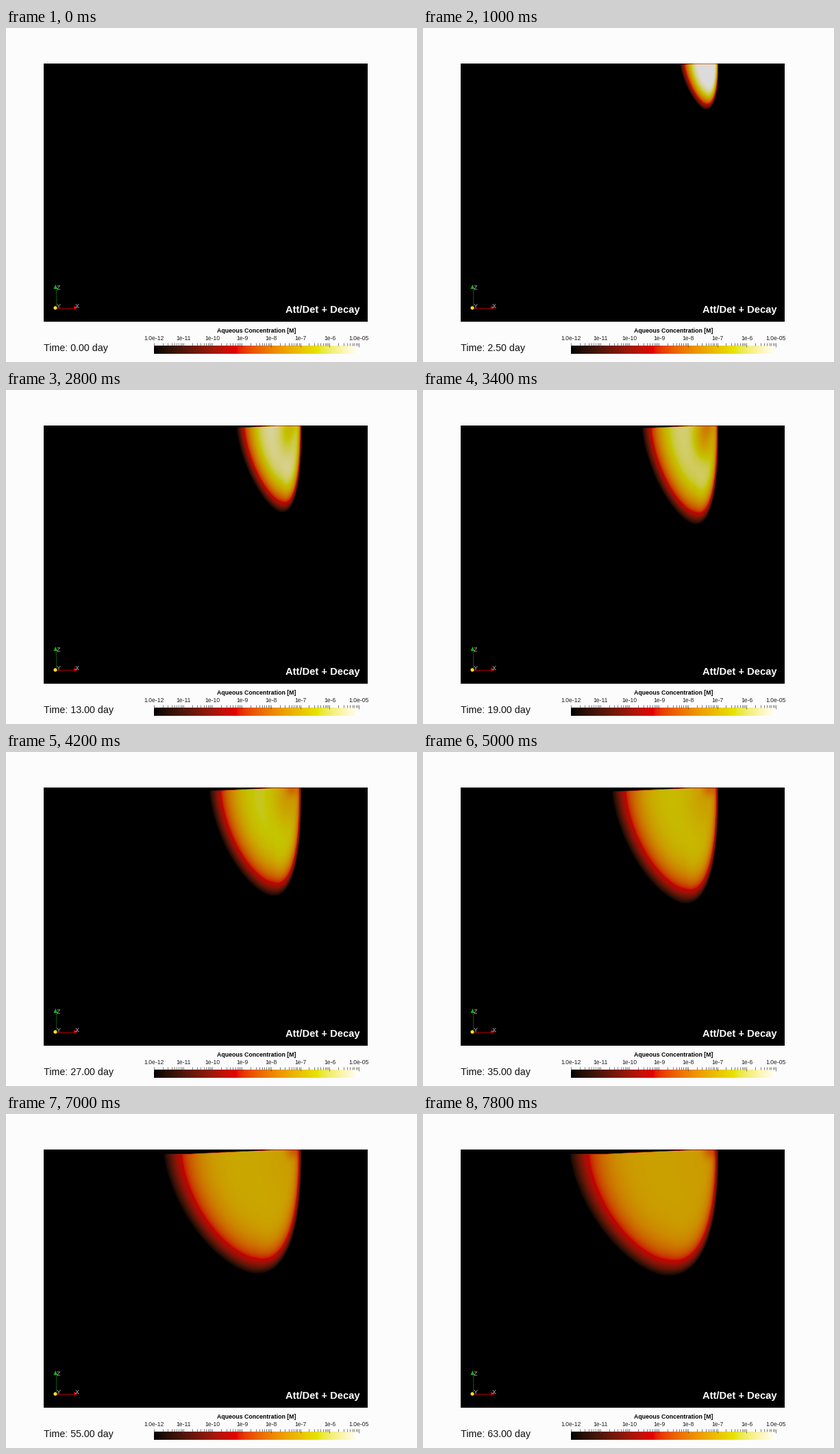
A matplotlib script for the animation above (8 s loop, 600 px wide and 489 px high).

```python
import numpy as np
import matplotlib.pyplot as plt
from matplotlib.animation import FuncAnimation
from matplotlib.patches import Circle, Polygon, Rectangle

W, H, DPI = 600, 489, 96
FRAMES, STEP_MS = 40, 200
LIGHT = 0.86  # shading of the lit surface against the plain colour bar

# Black-body colour map, blended in CIE Lab
STOPS = [0, 0.4, 0.8, 1]
STOP_RGB = np.array([[0, 0, 0], [0.9, 0, 0], [0.9, 0.9, 0], [1, 1, 1]])
TO_XYZ = np.array([[0.4124, 0.3576, 0.1805],
                   [0.2126, 0.7152, 0.0722],
                   [0.0193, 0.1192, 0.9505]])
WHITE = TO_XYZ.sum(axis=1)


def rgb_to_lab(rgb):
    lin = np.where(rgb > 0.04045, ((rgb + 0.055) / 1.055) ** 2.4, rgb / 12.92)
    t = lin @ TO_XYZ.T / WHITE
    f = np.where(t > 0.008856, np.cbrt(t), 7.787 * t + 16 / 116)
    x, y, z = f.T
    return np.stack([116 * y - 16, 500 * (x - y), 200 * (y - z)], axis=1)


def lab_to_rgb(lab):
    y = (lab[:, 0] + 16) / 116
    f = np.stack([y + lab[:, 1] / 500, y, y - lab[:, 2] / 200], axis=1)
    t = np.where(f > 0.2069, f ** 3, (f - 16 / 116) / 7.787)
    lin = np.clip(t * WHITE @ np.linalg.inv(TO_XYZ).T, 0, 1)
    return np.where(lin > 0.0031308, 1.055 * lin ** (1 / 2.4) - 0.055, 12.92 * lin)


levels = np.linspace(0, 1, 512)
stop_lab = rgb_to_lab(STOP_RGB)
LUT = np.clip(lab_to_rgb(np.stack(
    [np.interp(levels, STOPS, stop_lab[:, i]) for i in range(3)], axis=1)), 0, 1)


def colour(v):
    return LUT[(np.clip(v, 0, 1) * (len(LUT) - 1)).astype(int)]


# Plume shape at a few days; values between follow the square root of time
DAYS = [0, 5, 19, 27, 35, 47, 63]
KEYS = dict(
    left=[394, 367, 319, 296, 275, 247, 213],
    mid=[414, 411, 397, 389, 382, 373, 355],
    depth=[0, 96, 145, 159, 170, 179, 185],
    peak=[1.06, 1.06, 0.9, 0.82, 0.775, 0.74, 0.695],
    dip=[0, 0, 0.25, 0.14, 0.08, 0.035, 0.01],
    dip_w=[14, 14, 17, 22, 26, 30, 34],
    dip_h=[30, 30, 36, 44, 50, 56, 60],
    spot=[0, 0, 0.1, 0.15, 0.15, 0.15, 0.15],
    power=[1.4, 1.45, 1.55, 1.6, 1.6, 1.6, 1.6],
    q_left=[2.4, 2.4, 3, 3.2, 3.4, 3.6, 3.8],
    q_low=[3.3, 3.3, 4.4, 4.9, 5.3, 5.7, 6.2],
    q_right=[9, 9, 13, 14, 15, 16, 17],
)
TOP, RIGHT = 52, 431.5
X0, X1, Y1 = 200, 440, 245
px, py = np.meshgrid(np.arange(X0, X1) + 0.5, np.arange(TOP, Y1) + 0.5)


def gauss(cx, cy, sx, sy):
    return np.exp(-((px - cx) / sx) ** 2 - ((py - cy) / sy) ** 2)


def plume(day):
    """Log concentration, scaled to 0..1, on the pixel grid."""
    if day == 0:
        return np.zeros_like(px)
    k = {name: np.interp(day ** 0.5, np.sqrt(DAYS), vals)
         for name, vals in KEYS.items()}
    dx = px - k["mid"]
    x = dx / np.where(dx < 0, k["mid"] - k["left"], RIGHT - k["mid"])
    y = (py - TOP) / k["depth"]
    p = np.where(dx < 0, k["power"], 2.5)
    r = (np.abs(x) ** p + y ** p) ** (1 / p)
    q = np.exp(np.interp(np.arctan2(y, x), [0, np.pi / 2, np.pi],
                         np.log([k["q_right"], k["q_low"], k["q_left"]])))
    v = k["peak"] * (1 - np.minimum(r, 1) ** q)
    v -= k["dip"] * gauss(411, 66, k["dip_w"], k["dip_h"])
    v -= k["spot"] * gauss(418, 53, 10, 12)
    # dry wedge under the upper boundary
    surface = TOP + 6 * np.clip((395 - px) / 130, 0, 1)
    return v * np.clip((py - surface) / 1.5 + 0.2, 0, 1)


def day_at(n):
    return 0.5 * n if n <= 10 else 5 + 2 * (n - 10)


plt.rcParams["font.family"] = "Liberation Sans"
fig = plt.figure(figsize=(W / DPI, H / DPI), dpi=DPI, facecolor="#fdfcfd")
ax = fig.add_axes([0, 0, 1, 1])
ax.axis("off")


def label(x, y, s, size, **kw):
    kw.setdefault("color", "black")
    return ax.text(x, y, s, fontsize=size * 72 / DPI, va="baseline", **kw)


def line(xs, ys, col, width=1, **kw):
    ax.plot(xs, ys, color=col, lw=width * 72 / DPI, solid_capstyle="butt", **kw)


ax.add_patch(Rectangle((55, 51.5), 473, 378.5, fc="black", ec="none"))
field = ax.imshow(np.zeros(px.shape + (3,)), extent=(X0, X1, Y1, TOP),
                  interpolation="nearest", aspect="auto", zorder=2)
label(517, 416.5, "Att/Det + Decay", 14.7, color="white", weight="bold", ha="right")

# Orientation axes
line([72, 100], [409.5, 409.5], "#a00000")
line([72.5, 72.5], [406, 382], "#1fa01f", 1, ls=(0, (1.5, 1.5)))
ax.add_patch(Polygon([(99, 407), (99, 412), (106, 409.5)], fc="#e00000", ec="none"))
ax.add_patch(Polygon([(69.5, 382), (75, 382), (72.3, 375.5)], fc="#18b018", ec="none"))
for x, y, s in [(73.5, 383, "Z"), (73.5, 410.5, "Y"), (101, 409.5, "X")]:
    label(x, y, s, 9, color="#b8b8b8")
ax.add_patch(Circle((72, 409.8), 2.6, fc="#f0e020", ec="none", zorder=3))

# Colour bar
BAR_L, BAR_R, DECADES = 216, 515, 7
ax.imshow(colour(np.linspace(0, 1, BAR_R - BAR_L))[None],
          extent=(BAR_L, BAR_R, 477, 465), aspect="auto", interpolation="nearest")
decade = (BAR_R - BAR_L) / DECADES
for i in range(DECADES):
    for m in range(1, 10):
        x = BAR_L + decade * (i + np.log10(m))
        line([x, x], [460.5, 465 if m > 1 else 466.5], "#444444", 0.7)
line([BAR_R, BAR_R], [460.5, 466.5], "#444444", 0.7)
for i in range(DECADES + 1):
    name = {0: "1.0e-12", DECADES: "1.0e-05"}.get(i, f"1e-{12 - i}")
    label(BAR_L + decade * i + 0.5, 457, name, 8.6, ha="center", color="#222222")
label(365.5, 446.5, "Aqueous Concentration [M]", 8.7, weight="bold", ha="center")

clock = label(55, 473.5, "", 14.3, color="#111111")
ax.set_xlim(0, W)
ax.set_ylim(H, 0)


def draw(n):
    day = day_at(n)
    field.set_data(colour(plume(day)) * LIGHT)
    clock.set_text(f"Time: {day:.2f} day")
    return field, clock


anim = FuncAnimation(fig, draw, frames=FRAMES, interval=STEP_MS,
                     repeat=True, repeat_delay=0)
plt.show()
```
